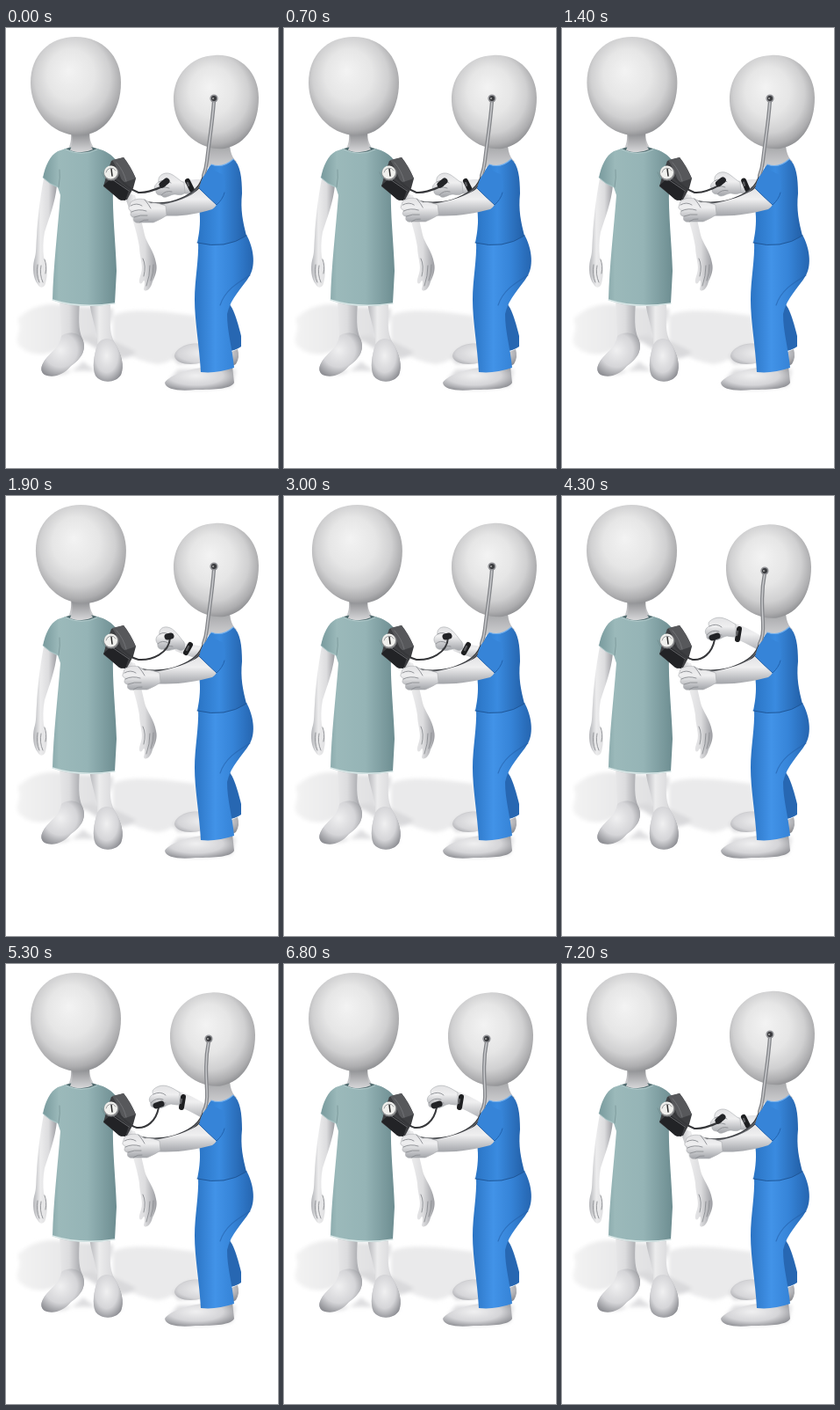
An HTML page for the animation above (8200 ms loop, 310 by 500 pixels).

```html
<!DOCTYPE html>
<html lang="en">
<head>
<meta charset="utf-8">
<title>Blood pressure check</title>
<style>
html, body { margin: 0; width: 100%; height: 100%; overflow: hidden; background: #fff; }
svg { display: block; width: 310px; height: 500px; }
.line { fill: none; stroke-linecap: round; stroke-linejoin: round; }
.crease { fill: none; stroke: #8b8d91; stroke-width: .9; stroke-linecap: round; }
</style>
</head>
<body>
<svg viewBox="0 0 310 500">
<defs>
  <radialGradient id="head" cx=".48" cy=".44" r=".58" fx=".42" fy=".34">
    <stop offset="0" stop-color="#f3f3f3"/><stop offset=".45" stop-color="#e6e6e6"/>
    <stop offset=".72" stop-color="#d0d0d1"/><stop offset=".9" stop-color="#adadaf"/>
    <stop offset="1" stop-color="#8d8e91"/>
  </radialGradient>
  <linearGradient id="limb">
    <stop offset="0" stop-color="#b4b5b9"/><stop offset=".3" stop-color="#ececed"/>
    <stop offset=".65" stop-color="#dcdcde"/><stop offset="1" stop-color="#9b9ca1"/>
  </linearGradient>
  <linearGradient id="arm" x2="0" y2="1">
    <stop offset="0" stop-color="#e2e2e4"/><stop offset=".4" stop-color="#efeff0"/>
    <stop offset="1" stop-color="#a2a4a9"/>
  </linearGradient>
  <linearGradient id="neck" x2="0" y2="1">
    <stop offset="0" stop-color="#8f9093"/><stop offset="1" stop-color="#d8d8da"/>
  </linearGradient>
  <radialGradient id="foot" cx=".45" cy=".4" r=".65">
    <stop offset="0" stop-color="#f0f0f1"/><stop offset=".6" stop-color="#d5d5d8"/>
    <stop offset="1" stop-color="#8f9095"/>
  </radialGradient>
  <linearGradient id="gown">
    <stop offset="0" stop-color="#789a9d"/><stop offset=".22" stop-color="#9bb9ba"/>
    <stop offset=".6" stop-color="#95b4b6"/><stop offset="1" stop-color="#6d8d91"/>
  </linearGradient>
  <linearGradient id="shirt">
    <stop offset="0" stop-color="#2a74c4"/><stop offset=".45" stop-color="#3a8be0"/>
    <stop offset="1" stop-color="#225fa7"/>
  </linearGradient>
  <linearGradient id="pants">
    <stop offset="0" stop-color="#2b74c4"/><stop offset=".35" stop-color="#4293e8"/>
    <stop offset=".65" stop-color="#3684d8"/><stop offset="1" stop-color="#2565b0"/>
  </linearGradient>
  <linearGradient id="fade" x1="0" x2="1">
    <stop offset="0" stop-color="#f3f3f3"/><stop offset="1" stop-color="#dcdcde"/>
  </linearGradient>
  <filter id="soft" x="-20%" y="-20%" width="140%" height="140%"><feGaussianBlur stdDeviation="2"/></filter>
</defs>

<!-- floor shadows -->
<g filter="url(#soft)">
  <path fill="url(#fade)" d="M13 331C25 318 44 311 64 315L122 319C121 346 98 358 66 360C48 376 24 372 14 360C9 350 20 343 13 331Z"/>
  <path fill="#eaeaeb" d="M122 327C140 317 180 322 216 327L220 362C198 366 194 380 172 382C150 378 134 369 122 362Z"/>
  <path fill="#d9d9db" d="M84 352C100 346 122 354 148 368C142 376 130 377 118 374ZM190 374C202 357 226 352 222 380L196 382Z"/>
  <path fill="#dedee0" d="M48 389Q66 402 88 379L106 393Q128 403 132 390ZM182 405Q205 416 258 407L262 388H196Z"/>
</g>

<!-- patient -->
<path fill="url(#limb)" d="M61 309H84C83 329 82 342 87 353C93 367 84 377 74 384C65 395 53 398 44 394C37 389 41 380 49 372C57 364 63 358 63 350Z"/>
<path fill="url(#foot)" d="M63 350C69 345 82 345 87 353C93 367 84 377 74 384C65 395 53 398 44 394C37 389 41 380 49 372C57 364 62 358 63 350Z"/>
<path fill="url(#limb)" d="M95 311H119C119 332 117 346 124 358C132 371 135 384 131 394C125 404 108 404 102 395C98 386 100 373 104 360C105 345 98 333 95 311Z"/>
<path fill="url(#foot)" d="M104 360C108 352 119 350 124 358C132 371 135 384 131 394C125 404 108 404 102 395C98 386 100 373 104 360Z"/>
<path fill="url(#limb)" d="M43 171L58 179C56 199 49 216 44 232C42 242 42 252 43 260C47 270 48 280 45 290C44 296 38 296 36 291C31 285 30 273 32 264C35 255 34 247 35 237C36 216 39 192 43 171Z"/>
<path class="crease" d="M36 269Q34 280 38 289M40 270Q38 280 42 289M44 263Q47 270 45 279"/>
<path fill="url(#limb)" d="M134 187L147 190C151 203 154 218 158 235C160 244 169 254 171 267C173 275 170 282 167 288C165 297 159 301 157 297C159 289 158 283 155 290C151 292 151 287 154 279C157 270 152 260 152 249C149 229 141 208 134 187Z"/>
<path class="crease" d="M164 270Q164 282 160 293M168 269Q168 279 165 287M156 262Q160 270 157 282"/>
<path fill="url(#neck)" d="M73 112H96C94 124 96 132 102 138L70 139C75 130 75 122 73 112Z"/>
<path fill="#4d686c" d="M66 138Q86 130 106 138L104 144Q86 148 69 143Z"/>
<path fill="url(#neck)" d="M75 120H95Q94 132 99 138Q86 144 73 139Q77 130 75 120Z"/>
<path fill="url(#gown)" d="M68 137Q86 146 104 137C113 139 121 144 126 151L122 183C121 209 125 246 126 276L124 313C101 318 72 317 53 309C54 270 59 229 62 190L59 181Q51 179 42 170C45 156 50 145 59 140Z"/>
<path class="line" stroke="#668386" stroke-width="1" opacity=".55" d="M60 181Q62 169 61 161M119 181Q112 173 109 164"/>
<path class="line" stroke="#dae8e8" stroke-width="1.4" d="M53 309Q84 319 124 313"/>
<path class="line" stroke="#b9d0d1" stroke-width=".8" d="M42 170Q50 178 59 181M68 138Q86 147 104 138"/>
<g id="pHead">
  <path fill="url(#head)" d="M79.500 10C110 10 131 32 131 62C131 94 113 122 83 122C51 122 28 93 28 62C28 31 49 10 79.500 10Z"/>
</g>

<!-- cuff -->
<path fill="#3d3e41" d="M120 151L134 147Q142 157 148 171L145 182L138 195L131 196L111 180Q115 164 120 151Z"/>
<path fill="#57585b" d="M121 150L134 147Q142 157 148 171L133 176Q128 161 121 150Z"/>
<path fill="#222326" d="M111 179L121 170L140 184L136 196L129 195Z"/>
<path class="line" stroke="#77787b" stroke-width=".8" d="M126 153Q134 162 137 174M121 172L140 185"/>

<!-- clinician -->
<path fill="#2767b2" d="M247 312C256 306 263 330 268 350V362Q258 369 247 367Z"/>
<path fill="url(#foot)" d="M222 359C209 357 193 363 192 373C194 382 210 384 224 380ZM257 368L264 365Q267 374 262 382L255 386Z"/>
<path fill="url(#foot)" d="M223 386C208 388 187 394 181 403C182 411 198 413 216 411C238 411 257 410 260 403L258 384Z"/>
<path id="backArm" fill="url(#arm)"/>
<path id="watch" class="line" stroke="#1d1e20" stroke-width="6"/>
<path id="face" class="line" stroke="#58595c" stroke-width="2.500"/>
<path id="backHand" fill="url(#arm)" stroke="#a7a9ad" stroke-width=".6"/>
<path id="backLines" class="crease"/>
<path id="airTube" class="line" stroke="#36373a" stroke-width="2"/>
<path id="bulb" class="line" stroke="#222326" stroke-width="7"/>
<path fill="url(#neck)" d="M229 126L255 119C254 136 256 146 263 152L240 164L228 157Q231 140 229 126Z"/>
<g id="nHead">
  <path fill="url(#head)" d="M238 31C266 29 288 50 288 79C288 108 275 132 249 137C219 140 192 115 191 83C190 53 211 32 238 31Z"/>
</g>
<path fill="url(#pants)" d="M219 242L274 235C282 249 285 269 278 281C270 295 256 306 252 325C252 346 258 363 260 386Q240 393 222 391C220 358 215 333 215 309C215 286 220 263 219 242Z"/>
<path class="line" stroke="#235fa9" stroke-width="1.200" opacity=".6" d="M278 281C265 289 250 297 244 315"/>
<path fill="url(#shirt)" d="M234 155Q247 160 259 149C267 155 269 170 269 188C267 207 270 220 274 236Q250 252 218 244C221 230 222 217 220 205L224 183C224 171 228 162 234 155Z"/>
<path class="line" stroke="#1f5798" stroke-width="1" d="M218 244Q250 252 274 236"/>
<path class="line" stroke="#73b0ee" stroke-width="1.100" d="M234 155Q247 160 259 149"/>
<path id="scope" class="line" stroke="#3d3f43" stroke-width="3.600"/>
<path id="scopeLight" class="line" stroke="#77797e" stroke-width="1"/>
<path id="earTube" class="line" stroke="#85878b" stroke-width="4.200"/>
<path id="earLight" class="line" stroke="#c8c9cc" stroke-width="1.500"/>
<g id="ear">
  <circle cx="237" cy="80" r="4.600" fill="#929397"/><circle cx="237" cy="80" r="3" fill="#393a3d"/><circle cx="236" cy="80" r="1" fill="#aaa"/>
</g>
<path id="frontArm" fill="url(#arm)"/>
<path fill="#3684d8" d="M233 160C221 170 222 178 220 182Q230 192 240 201C250 193 253 176 246 166Z"/>
<path class="line" stroke="#2262ad" stroke-width="1" d="M220 182Q230 192 240 201Q247 195 249 187"/>
<g id="frontHand">
  <path fill="url(#arm)" stroke="#a9abaf" stroke-width=".6" d="M182 202C174 199 169 198 165 199L158 195C151 193 146 195 142 198L140 204C139 207 143 207 143 209C140 213 144 215 146 215C144 220 148 222 152 221L168 221C175 218 180 215 183 213Z"/>
  <path class="crease" d="M143 209Q151 205 160 208M146 215Q153 212 161 213M158 195Q163 201 165 205M142 202Q149 198 155 202M152 221Q157 217 162 218"/>
</g>
<circle cx="120" cy="165" r="8.600" fill="#88898b"/>
<circle cx="119.500" cy="164" r="7.600" fill="#f0f0ed"/>
<path class="line" stroke="#29292a" stroke-width="1.500" d="M120 160L121 168"/>
<path class="line" stroke="#9a9b9d" stroke-width="1" d="M114 164A6 6 0 0 1 125 162"/>
</svg>
<script>
const LOOP = 8200, STEP = 100;
const el = id => document.getElementById(id);
const ease = x => x * x * (3 - 2 * x);
const mix = (a, b, k) => a + (b - a) * k;

// Eased value at t from [time, value] pairs
function track(keys, t) {
  for (let i = 1; i < keys.length; i++) {
    const [t0, a] = keys[i - 1], [t1, b] = keys[i];
    if (t < t1) return mix(a, b, ease(Math.max(0, (t - t0) / (t1 - t0))));
  }
  return keys[keys.length - 1][1];
}

// Blends paths that share the same commands
function blend(poses, p) {
  const i = Math.min(poses.length - 2, Math.floor(p));
  const next = poses[i + 1].match(/-?[\d.]+/g);
  let n = 0;
  return poses[i].replace(/-?[\d.]+/g, v => mix(+v, +next[n++], p - i).toFixed(2));
}

// Hand poses: resting, pumping, reading the watch
const reach = {
  backArm: [
    'M190 177Q210 171 231 172L232 190Q212 190 194 187Z',
    'M190 164Q211 170 231 171L232 188Q212 184 193 176Z',
    'M187 142Q212 148 231 162L230 179Q209 166 188 158Z'],
  watch: ['M207 174L212 184', 'M210 169L205 178', 'M202 151L200 163'],
  face: ['M207 176L208 179', 'M208 171L206 175', 'M200 154L199 158'],
  backHand: [
    'M203 176C195 172 190 164 182 165C176 166 173 170 174 175C169 178 168 182 171 184C170 189 174 190 177 190C181 196 188 188 193 189C199 190 201 190 204 187Z',
    'M203 166C197 160 192 150 184 149C177 148 174 153 175 157C170 160 170 165 173 168C172 173 176 175 180 174C184 178 191 173 195 174C199 176 201 176 204 173Z',
    'M198 146C190 141 182 136 174 139C169 141 165 144 168 148C163 150 162 155 165 158C164 162 167 164 171 162C176 167 182 160 188 159C192 160 195 160 198 159Z'],
  backLines: [
    'M174 175Q181 171 188 176M171 184Q178 179 186 182M177 190Q182 184 189 186',
    'M175 157Q181 153 188 159M173 168Q178 163 185 167M180 174Q184 169 190 171',
    'M168 148Q176 144 182 149M165 158Q171 151 179 154M171 162Q176 156 182 158'],
  airTube: [
    'M181 179C171 183 161 188 151 187C142 184 135 177 128 170',
    'M187 161C186 179 166 187 151 186C142 184 135 177 128 170',
    'M174 163C171 179 160 187 149 186C141 184 135 177 128 170'],
  bulb: ['M178 178L183 174', 'M184 160L188 159', 'M171 161L177 159']
};
const squeeze = {
  frontArm: [
    'M221 182C209 193 194 198 176 201L177 213C197 215 215 212 235 206Q241 202 240 198Z',
    'M221 182C209 190 190 197 168 200L169 213C194 215 215 211 235 206Q241 202 240 198Z'],
  scope: [
    'M226 166C223 182 211 190 199 195C188 200 174 201 162 199',
    'M226 166C223 182 210 189 198 194C184 200 163 201 147 196']
};
const tilt = {
  earTube: [
    'M237 83C235 110 231 132 229 151Q228 160 225 168',
    'M231 88C227 108 228 126 229 143Q230 160 225 168']
};

const reachKeys = [[1300, 0], [1900, 1], [3100, 1], [4300, 2], [6800, 2], [7200, 0]];
const squeezeKeys = [[0, 0], [800, 1], [6800, 1], [7200, 0]];
const tiltKeys = [[3100, 0], [4300, 1], [6800, 1], [7200, 0]];
const lookKeys = [[1300, 0], [1950, 6], [2400, 6], [3900, 0]];

function pose(shapes, p) {
  for (const id in shapes) el(id).setAttribute('d', blend(shapes[id], p));
}
const shift = (id, x, y) => el(id).setAttribute('transform', `translate(${x} ${y})`);

function draw(now) {
  const t = Math.floor(now % LOOP / STEP) * STEP;
  const s = track(squeezeKeys, t), k = track(tiltKeys, t), look = track(lookKeys, t);
  pose(reach, track(reachKeys, t));
  pose(squeeze, s);
  pose(tilt, k);
  el('scopeLight').setAttribute('d', el('scope').getAttribute('d'));
  el('earLight').setAttribute('d', el('earTube').getAttribute('d'));
  shift('frontHand', -7 * s, -s);
  shift('pHead', look, 0);
  shift('nHead', -4 * k, 1.5 * k);
  shift('ear', -6 * k, 5 * k);
  requestAnimationFrame(draw);
}
draw(performance.now());
</script>
</body>
</html>
```
